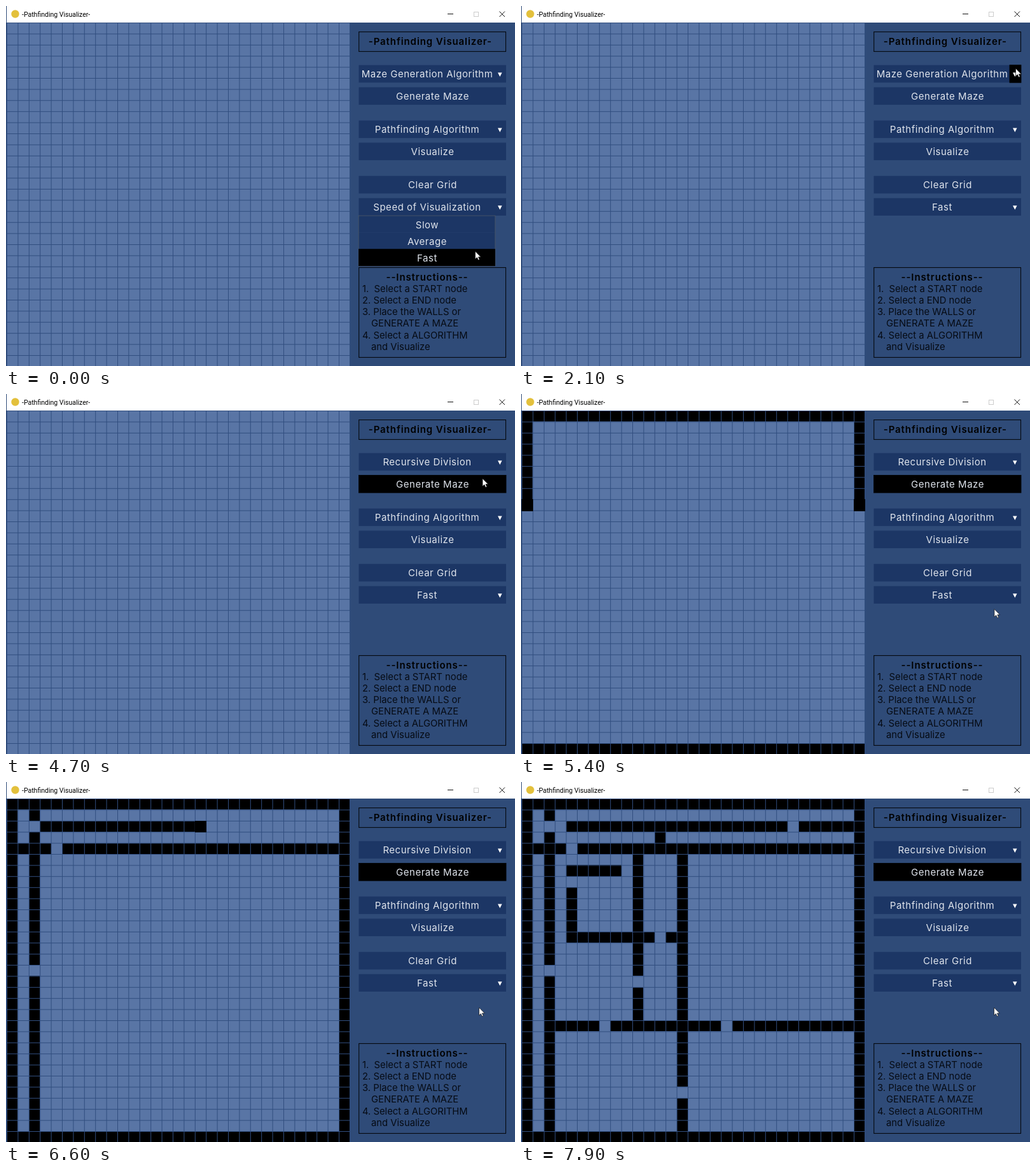
These frames come from a looping animation (800x565 px, 8 s). An HTML page with a canvas:

```html
<!DOCTYPE html>
<html lang="en">
<head>
<meta charset="utf-8">
<title>Pathfinding Visualizer</title>
<style>
  html, body { margin: 0; width: 100%; height: 100%; overflow: hidden; background: #2f4b78; }
  canvas, svg { position: absolute; left: 0; top: 0; width: 800px; height: 565px; }
  text { font-family: Inter, "Open Sans", sans-serif; font-size: 15px; }
  .label { fill: #dfe4ec; text-anchor: middle; letter-spacing: .52px; }
  .head { fill: #000; font-weight: 600; text-anchor: middle; letter-spacing: .9px; }
  .note { fill: #060b14; font-size: 14.8px; white-space: pre; }
  .bar { font-family: Roboto, "Open Sans", sans-serif; font-size: 10.5px; fill: #000; }
  .box { fill: none; stroke: #05090f; stroke-width: 1.1; }
  .btn { fill: #1c3665; }
  .btn.hot { fill: #000; stroke: #000; stroke-width: .8; }
  .frame { fill: none; stroke: #4d5866; stroke-width: 1.6; }
  .tri { fill: #fff; }
</style>
</head>
<body>
<canvas id="grid" width="800" height="565"></canvas>
<svg id="ui" viewBox="0 0 800 565">
  <rect x="1" width="799" height="26" fill="#fff"/>
  <circle cx="14.5" cy="12.5" r="6.2" fill="#e3c03c"/>
  <text class="bar" x="25" y="16.5">-Pathfinding Visualizer-</text>
  <g fill="none" stroke="#111">
    <path d="M694 12.5h9"/>
    <rect x="735.5" y="9.5" width="7" height="7" stroke="#ccc"/>
    <path d="M775.5 8.5l8.5 8.5m0-8.5l-8.5 8.5"/>
  </g>

  <rect class="box" x="554.7" y="40.6" width="230.8" height="30.8"/>
  <text class="head" x="666.8" y="61">-Pathfinding Visualizer-</text>

  <rect class="box" x="554.7" y="410.5" width="230.8" height="141"/>
  <text class="head" x="662" y="430.5">--Instructions--</text>
  <g id="notes"></g>
  <g id="buttons"></g>
  <g id="menus"></g>
  <path id="cursor" d="M0 0V12.2L2.8 9.6L4.8 13.8L6.7 12.9L4.9 8.9H8.8Z"
        fill="#fff" stroke="#111" stroke-width=".7"/>
</svg>
<script>
const LOOP = 8000, STEP = 100;
const N = 31, PITCH = 17.4, LEFT = 1, TOP = 26;
const $ = id => document.getElementById(id);

function add(parent, tag, attrs, text) {
  const el = document.createElementNS('http://www.w3.org/2000/svg', tag);
  for (const k in attrs) el.setAttribute(k, attrs[k]);
  if (text) el.textContent = text;
  parent.appendChild(el);
  return el;
}

// ---- side panel ----
[
  [560, '1.  Select a START node'], [560, '2. Select a END node'],
  [560, '3. Place the WALLS or'], [574, 'GENERATE A MAZE'],
  [560, '4. Select a ALGORITHM'], [574, 'and Visualize']
].forEach(([x, s], i) => add($('notes'), 'text', { class: 'note', x, y: 448.7 + i * 18.25 }, s));

const zones = [];
function zone(parent, x, y, w, h, name) {
  const el = add(parent, 'rect', { class: 'btn', x, y, width: w, height: h });
  zones.push({ el, x, y, w, h, name });
}

function button(y, name, drop) {
  const g = $('buttons');
  zone(g, 554.5, y, drop ? 213.5 : 231.5, 27.5, name);
  const label = add(g, 'text', { class: 'label', x: drop ? 662 : 670.5, y: y + 19.2 }, name);
  if (drop) {
    zone(g, 768, y, 18, 27.5, 'arrow');
    add(g, 'path', { class: 'tri', d: `M773 ${y + 11.7}h6.6l-3.3 6.6z` });
  }
  return label;
}

const mazeLabel = button(92.7, 'Maze Generation Algorithm', true);
button(127.5, 'Generate Maze');
button(179.7, 'Pathfinding Algorithm', true);
button(214.5, 'Visualize');
button(266.7, 'Clear Grid');
const speedLabel = button(301.5, 'Speed of Visualization', true);

function menu(y, items) {
  const g = add($('menus'), 'g', {});
  const m = { g, rows: [] };
  add(g, 'rect', { class: 'frame', x: 554.5, y, width: 214, height: 26.1 * items.length });
  items.forEach((s, i) => {
    const top = y + i * 26.1;
    const el = add(g, 'rect', { class: 'btn', x: 554.5, y: top, width: 214, height: 26.1 });
    m.rows.push({ el, x: 554.5, y: top, w: 214, h: 26.1 });
  });
  items.forEach((s, i) => add(g, 'text', { class: 'label', x: 662, y: y + i * 26.1 + 19 }, s));
  return m;
}
const mazeMenu = menu(120.9, ['Basic Random Maze', 'Recursive Division', 'Recursive Backtracking']);
const speedMenu = menu(329.5, ['Slow', 'Average', 'Fast']);

// ---- maze: a list of steps, each setting some cells [row, col] ----
const steps = [];
const set = (on, ...cells) => steps.push({ on, cells });

function divide(r0, c0, r1, c1, row, col, doors) {
  for (let c = c0; c <= c1; c++) set(1, [row, c]);
  for (let r = r0; r <= r1; r++) set(1, [r, col]);
  doors.forEach(d => set(0, d));
}
for (let i = 0; i < N; i++) set(1, [0, i], [N - 1, i]);
for (let i = 0; i < N; i++) set(1, [i, 0], [i, N - 1]);
divide(1, 1, 29, 29, 4, 2, [[4, 4], [2, 2], [15, 2]]);
divide(1, 3, 3, 29, 2, 12, [[2, 3], [2, 24], [1, 12]]);
divide(5, 3, 29, 29, 20, 14, [[20, 7], [20, 18], [26, 14]]);
divide(5, 3, 19, 13, 12, 10, [[12, 3], [12, 12], [16, 10]]);
divide(5, 3, 11, 9, 6, 4, [[6, 3], [6, 9], [5, 4], [7, 4]]);

// ---- timing ----
const progress = [[4880, 0], [6000, 87], [7200, 189], [7900, steps.length]];
const path = [
  [0, 737.5, 385], [200, 737.5, 387], [500, 737.5, 387], [1200, 768, 209],
  [1300, 768, 209], [2000, 777.5, 98], [2200, 777.5, 98], [2900, 746.7, 164.5],
  [3000, 746.7, 164.5], [3200, 752, 167], [4300, 752, 167], [4600, 749, 132.7],
  [4900, 749, 132.7], [5500, 743.5, 354]
];
const smooth = u => u * u * (3 - 2 * u);

function along(keys, t, ease = u => u) {
  if (t <= keys[0][0]) return keys[0].slice(1);
  for (let i = 1; i < keys.length; i++) {
    const a = keys[i - 1], b = keys[i];
    if (t < b[0]) {
      const u = ease((t - a[0]) / (b[0] - a[0]));
      return a.slice(1).map((v, k) => v + (b[k + 1] - v) * u);
    }
  }
  return keys[keys.length - 1].slice(1);
}

// ---- drawing ----
const ctx = $('grid').getContext('2d');
const px = c => Math.round(LEFT + c * PITCH);
const py = r => Math.round(TOP + r * PITCH);

function fillCell(r, c, color, extra = 0) {
  ctx.fillStyle = color;
  ctx.fillRect(px(c), py(r), px(c + 1) - px(c) + extra, py(r + 1) - py(r) + extra);
}

function drawGrid(count) {
  ctx.fillStyle = '#2f4b78';
  ctx.fillRect(0, 0, 800, 565);
  ctx.fillStyle = '#5975a5';
  ctx.fillRect(px(0), TOP, px(N) - px(0), py(N) - TOP);
  for (const { on, cells } of steps.slice(0, count))
    for (const [r, c] of cells) fillCell(r, c, on ? '#000' : '#5975a5');
  ctx.fillStyle = '#314e7f';
  for (let i = 0; i <= N; i++) {
    ctx.fillRect(LEFT + i * PITCH, TOP, 1, 539);
    ctx.fillRect(LEFT, TOP + i * PITCH, 539, 1);
  }
  // the newest wall cell still covers its grid lines
  const last = steps[count - 1];
  if (last && last.on) last.cells.forEach(([r, c]) => fillCell(r, c, '#000', 1));
}

const inside = (z, x, y) => x >= z.x && x < z.x + z.w && y >= z.y && y < z.y + z.h;

function draw(t) {
  const [x, y] = along(path, t, smooth);
  const speedOpen = t < 400, mazeOpen = t >= 2200 && t < 3500, busy = t >= 4900;
  const open = speedOpen || mazeOpen;

  $('cursor').setAttribute('transform', `translate(${x} ${y})`);
  mazeLabel.textContent = t < 3500 ? 'Maze Generation Algorithm' : 'Recursive Division';
  speedLabel.textContent = speedOpen ? 'Speed of Visualization' : 'Fast';
  for (const z of zones)
    z.el.classList.toggle('hot', busy ? z.name === 'Generate Maze' : !open && inside(z, x, y));
  for (const [m, shown] of [[mazeMenu, mazeOpen], [speedMenu, speedOpen]]) {
    m.g.style.display = shown ? '' : 'none';
    m.rows.forEach(z => z.el.classList.toggle('hot', inside(z, x, y)));
  }
  drawGrid(Math.round(along(progress, t)[0]));
}

let shown = -1;
const start = performance.now();
function tick() {
  const t = Math.floor(((performance.now() - start) % LOOP) / STEP) * STEP;
  if (t !== shown) draw(shown = t);
  requestAnimationFrame(tick);
}
tick();
</script>
</body>
</html>
```
